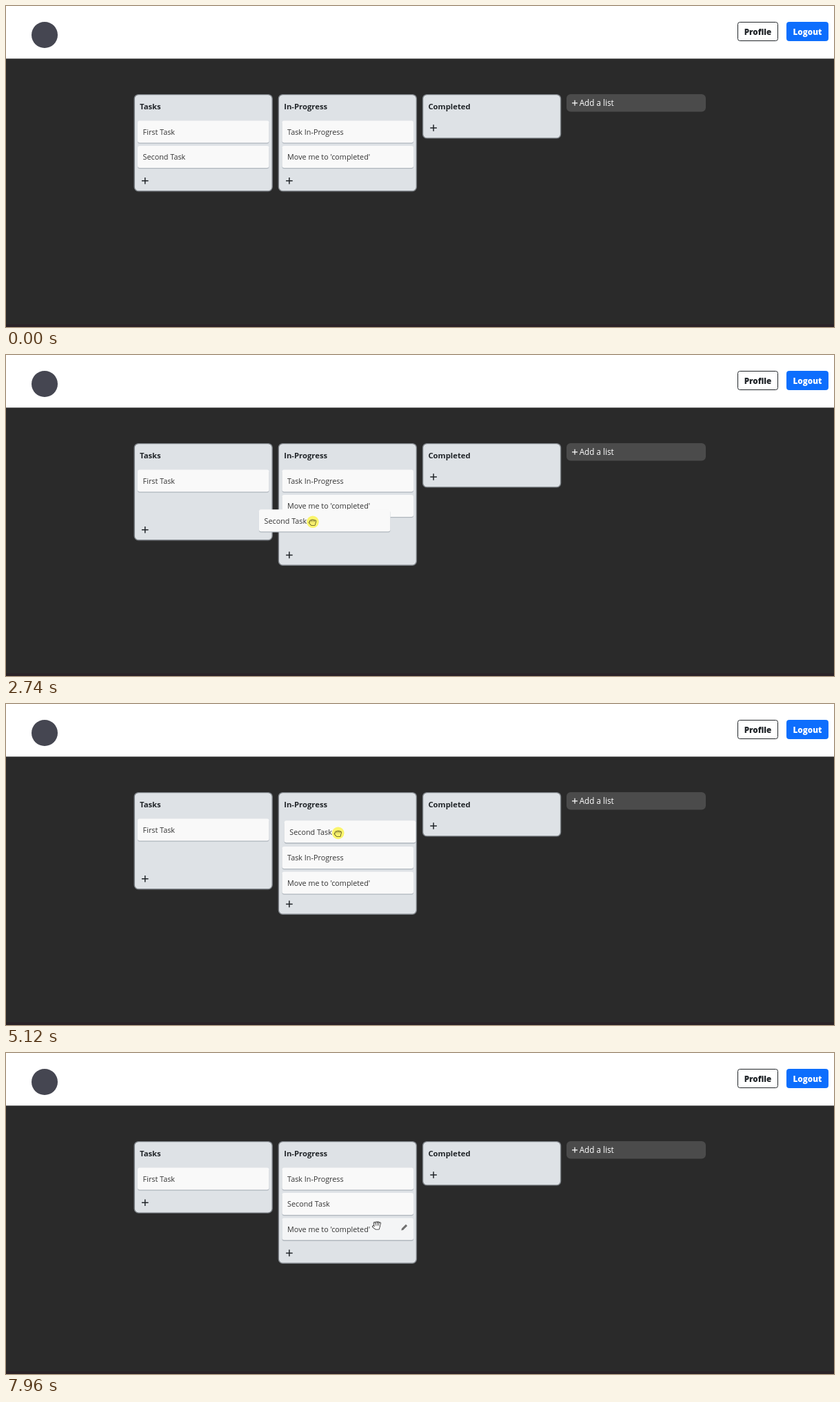
An HTML page for the animation above (8000 ms loop, 1201 px wide and 466 px high).

```html
<!DOCTYPE html>
<html lang="en">
<head>
<meta charset="utf-8">
<title>Task board</title>
<style>
  html, body { margin: 0; width: 100%; height: 100%; overflow: hidden; background: #2a2a2a; }
  svg { display: block; }
  text { font-family: "Open Sans", "Noto Sans", sans-serif; white-space: pre; }
  .task { font-size: 10.8px; fill: #343434; }
  .title { font-size: 11.3px; font-weight: 700; fill: #212529; }
  .button { font-size: 11.7px; font-weight: 800; text-anchor: middle; }
  .add { font-size: 11.7px; font-weight: 500; fill: #fff; }
</style>
</head>
<body>
<svg id="stage" width="1201" height="466" viewBox="0 0 1201 466"></svg>
<script>
const LOOP = 8000;
const STEP = 67;            // the pointer is sampled this often, in ms
const CARD_PITCH = 36.6;
const CARD_TOP = 166.5;
const LIST_X = 185.7, LIST_PITCH = 209.2;
const GRAB = [78, 18];      // pointer position inside the dragged card
const PRESS = 1430, GLOW = 1630, DRAG = 1820, RELEASE = 6570, SETTLED = 6960;

const stage = document.getElementById('stage');

function add(parent, tag, attrs = {}, text) {
  const el = document.createElementNS('http://www.w3.org/2000/svg', tag);
  for (const key in attrs) el.setAttribute(key, attrs[key]);
  if (text) el.textContent = text;
  parent.append(el);
  return el;
}

const box = (parent, x, y, width, height, rx, fill, more) =>
  add(parent, 'rect', { x, y, width, height, rx, fill, ...more });
const label = (parent, cls, x, y, text, more) =>
  add(parent, 'text', { class: cls, x, y, ...more }, text);
const place = (el, [x, y]) => el.setAttribute('transform', `translate(${x} ${y})`);
const show = (el, on) => el.setAttribute('visibility', on ? 'visible' : 'hidden');

const plus = (parent, x, y, r, stroke, width) => add(parent, 'path', {
  d: `M${x - r} ${y}h${2 * r}M${x} ${y - r}v${2 * r}`, stroke, 'stroke-width': width
});

function makeButton(x, width, text, fill, color, stroke) {
  box(stage, x + 0.5, 23.5, width - 1, 27, 3, fill, { stroke });
  label(stage, 'button', x + width / 2, 41.7, text, { fill: color });
}

function makeList(column, title) {
  const g = add(stage, 'g');
  place(g, [LIST_X + column * LIST_PITCH, 128]);
  const frame = box(g, 0.5, 0.6, 200, 0, 6, '#dee2e6', { stroke: '#7a7f84', 'stroke-width': 1.4 });
  label(g, 'title', 8.3, 22.4, title);
  const cross = plus(g, 16, 0, 4.8, '#212529', 1.5);
  return count => {
    const height = 64.6 + count * CARD_PITCH + 3.6 * Math.min(count, 1);
    frame.setAttribute('height', height - 1.3);
    place(cross, [0, height - 15.6]);
  };
}

function makeCard(text) {
  const g = add(stage, 'g');
  box(g, 0, 1.3, 190.5, 32, 3, '#afb6bd');
  const face = box(g, 0, 0, 190.5, 32, 3, '#f9f9f9');
  label(g, 'task', 7.6, 20.3, text);
  const pencil = add(g, 'path', {
    d: 'M172.8 18l.7-2.8 6-6 2.1 2.1-6 6z', fill: '#707070', visibility: 'hidden'
  });
  return {
    move: (x, y) => place(g, [x, y]),
    hover(on) {
      show(pencil, on);
      face.setAttribute('fill', on ? '#f4f5f6' : '#f9f9f9');
    }
  };
}

// Four fingers and a thumb on a palm: a dark pass for the outline, then a light one
function makeHand(parent, reach, skin, ink) {
  let d = `M-1.6 4H2.4L3 1H-2ZM-2 3.6L${-3 - reach * 0.35} 1`;
  for (let i = 0; i < 4; i++) {
    const x = 1.8 * i - 2.4, lean = (i - 1.5) * reach * 0.13;
    d += `M${x} 1.5L${x + lean} ${1.2 - reach + Math.abs(i - 1.4) * 0.8}`;
  }
  const g = add(parent, 'g');
  add(g, 'path', { d, fill: ink, stroke: ink, 'stroke-width': 3.2 });
  add(g, 'path', { d, fill: skin, stroke: skin, 'stroke-width': 1.6 });
  return g;
}

// Page
box(stage, 0, 0, 1201, 466, 0, '#2a2a2a');
box(stage, 0, 462, 1201, 4, 0, '#2a2227');
box(stage, 0, 0, 1201, 76.4, 0, '#fff');
add(stage, 'circle', { cx: 56, cy: 42, r: 19, fill: '#454651' });
makeButton(1061, 59, 'Profile', '#fff', '#212529', '#212529');
makeButton(1132, 61, 'Logout', '#0d6efd', '#fff', '#0d6efd');
box(stage, 813, 128, 202, 25.5, 6, '#4b4b4b');
plus(stage, 825, 140.8, 4, '#fff', 1.2);
label(stage, 'add', 831.7, 145, 'Add a list');

const [tasksList, progressList, completedList] =
  ['Tasks', 'In-Progress', 'Completed'].map((title, i) => makeList(i, title));
const [first, running, waiting, second] =
  ['First Task', 'Task In-Progress', "Move me to 'completed'", 'Second Task'].map(makeCard);
completedList(0);
first.move(191, CARD_TOP);

const pointer = add(stage, 'g', { 'stroke-linejoin': 'round', 'stroke-linecap': 'round' });
const glow = add(pointer, 'circle', { r: 8.8, fill: '#fbf45c', 'fill-opacity': 0.9 });
const arrow = add(pointer, 'path', { d: 'M-5 -7v13l4-3.5h5.5z', fill: '#fff', stroke: '#111' });
const openHand = makeHand(pointer, 6.5, '#fff', '#1a1a1a');
const fist = makeHand(pointer, 3.6, '#f8f06e', '#55511f');

// Pointer strokes: start, end, x and y reached
const strokes = [
  [500, 1100, 262, 217], [DRAG, 1886, 275.5, 225], [1953, 2610, 439.6, 242],
  [2670, 3200, 482, 244], [3600, 4400, 481, 208], [4460, 4730, 482, 186],
  [5120, 5590, 475.5, 217], [7360, 7560, 523, 250], [7830, 7960, 538, 251]
];

const smooth = p => p * p * (3 - 2 * p);
const mix = (a, b, p) => a + (b - a) * p;
const ramp = (t, start, end) =>
  smooth(Math.min(1, Math.max(0, (t - start) / (end - start))));

function pointerAt(t) {
  let at = [40, 307];
  for (const [start, end, x, y] of strokes) {
    if (t < start) break;
    const count = Math.round((end - start) / STEP) + 1;
    const p = t >= end ? 1 : smooth((Math.floor((t - start) / STEP) + 1) / count);
    at = [mix(at[0], x, p), mix(at[1], y, p)];
  }
  return at;
}

function draw(t) {
  const [px, py] = pointerAt(t);
  const settled = t >= SETTLED;
  const pressed = t >= PRESS && t < RELEASE;
  const overWaiting = t >= 7440;
  const overCard = t >= 900;

  tasksList(settled ? 1 : 2);
  progressList(2 + ramp(t, 2280, 2480));

  // Cards give way to the dragged one, then settle into the list
  const makeWay = ramp(t, 4180, 4540), comeBack = ramp(t, 5180, 5460);
  running.move(400.5, settled ? CARD_TOP : CARD_TOP + 40.5 * makeWay - 38.2 * comeBack);
  waiting.move(400.5, 203 + (settled ? CARD_PITCH : 40.5 * ramp(t, 3670, 3960)));

  if (t < DRAG) {
    second.move(191, 203);
  } else {
    const drop = ramp(t, RELEASE, 6850);
    second.move(mix(px - GRAB[0], 400.5, drop), mix(py - GRAB[1], 203, drop));
  }
  second.hover(overCard && (t < DRAG || settled) && !overWaiting);
  waiting.hover(overWaiting);

  place(pointer, [px, py]);
  show(arrow, t >= 500 && !overCard);
  show(openHand, overCard && !pressed);
  show(fist, pressed);
  show(glow, pressed && t >= GLOW);
}

const begin = performance.now();
function tick() {
  draw((performance.now() - begin) % LOOP);
  requestAnimationFrame(tick);
}
tick();
</script>
</body>
</html>
```
